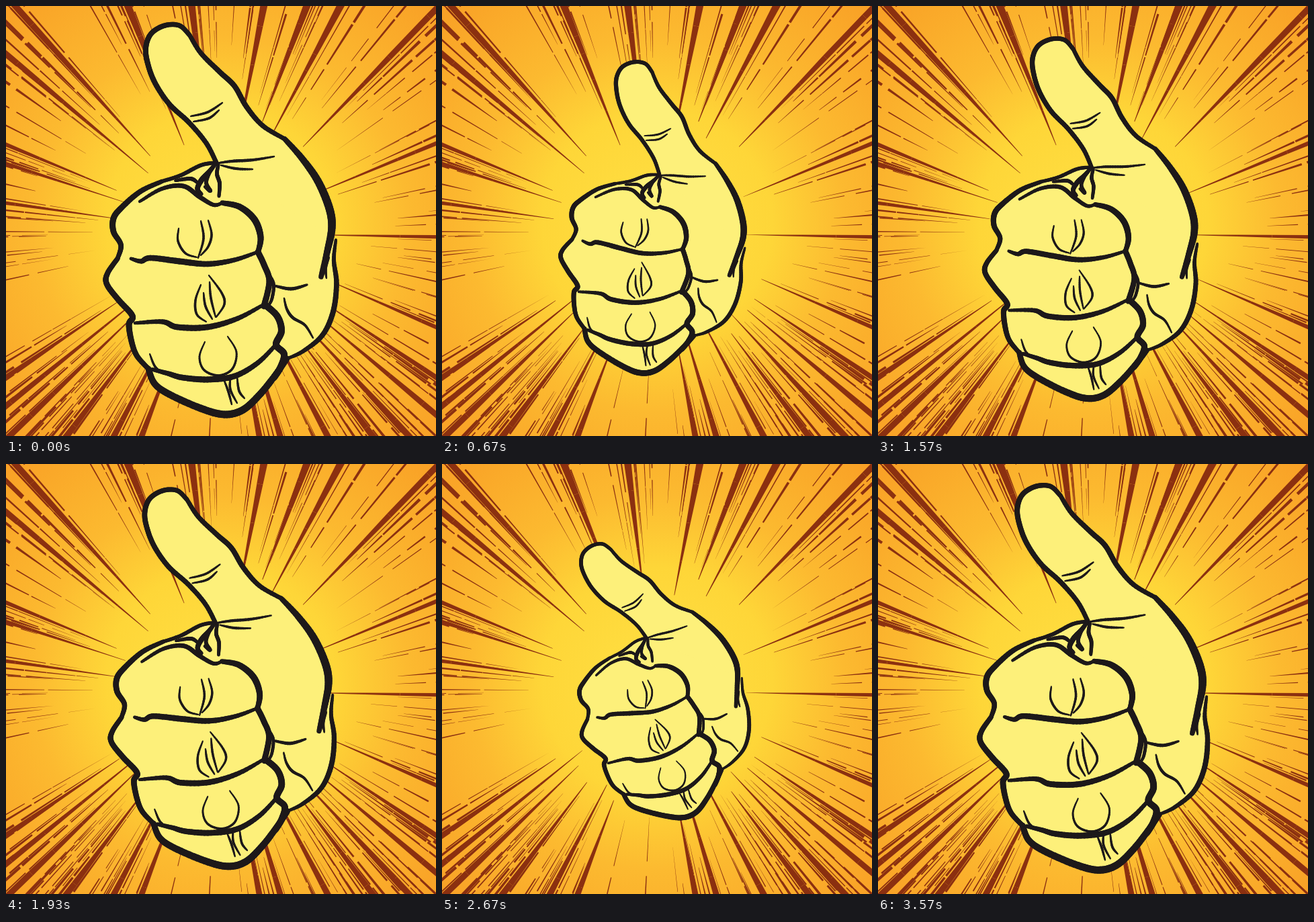
These frames come from a looping animation (640 by 640 pixels, 3610 ms). An HTML page with a canvas:

```html
<!DOCTYPE html>
<html lang="en">
<head>
<meta charset="utf-8">
<title>Thumbs up</title>
<style>
  html, body { margin: 0; height: 100%; overflow: hidden; background: #fbb02c; }
  canvas { display: block; width: 640px; height: 640px; }
</style>
</head>
<body>
<canvas id="stage" width="640" height="640"></canvas>
<script>
const SIZE = 640, LOOP = 3610, INK = '#1d191a', SKIN = '#fdf07a', RAY = '#8b3010';
const ctx = document.getElementById('stage').getContext('2d');

let seed = 11;
const random = (min, max) => {
  seed = (seed * 16807) % 2147483647;
  return min + (max - min) * seed / 2147483647;
};

// ---- Background: warm glow with comic speed lines ----
// Directions of the bold rays in degrees, clockwise from the right
const BOLD = [1, 23.5, 33.7, 40, 47, 53, 62, 73.4, 79, 111, 117.5, 127, 136, 141,
  146, 188, 198, 202.5, 220, 228, 248, 263, 281, 291, 298, 314, 337.5];

// A ray widens outwards; gaps between its pieces make it look dry-brushed
function ray(g, degrees, inner, width, gap) {
  g.save();
  g.translate(318, 338);
  g.rotate(degrees * Math.PI / 180);
  const half = r => width / 2 * Math.min(1, (r - inner + 15) / (400 - Math.min(inner, 300)));
  for (let r = inner; r < 480;) {
    const end = r + random(25, 90);
    g.beginPath();
    g.moveTo(r, -half(r));
    g.lineTo(end, -half(end));
    g.lineTo(end, half(end));
    g.lineTo(r, half(r));
    g.fill();
    r = end + random(0, gap);
  }
  g.restore();
}

function makeBackground() {
  const canvas = document.createElement('canvas');
  canvas.width = canvas.height = SIZE;
  const g = canvas.getContext('2d');
  const glow = g.createRadialGradient(320, 325, 0, 320, 325, 450);
  glow.addColorStop(0, '#ffe043');
  glow.addColorStop(.38, '#fed638');
  glow.addColorStop(.62, '#fcba30');
  glow.addColorStop(1, '#f9a126');
  g.fillStyle = glow;
  g.fillRect(0, 0, SIZE, SIZE);

  g.fillStyle = RAY;
  for (const angle of BOLD) {
    const steep = Math.abs(Math.sin(angle * Math.PI / 180));
    ray(g, angle, random(135, 190), 7 + 6 * steep ** 3, 0);
    for (let i = 0; i < 4; i++)
      ray(g, angle + random(-6, 6), random(180, 300), random(1.5, 4.5), 14);
  }
  for (let i = 0; i < 70; i++)
    ray(g, random(0, 360), random(180, 320), random(1.2, 2.8), 22);
  return canvas;
}

// ---- Hand: smooth curves through a few points ----
function curve(text) {
  const pts = text.split(' ').map(p => p.split(',').map(Number));
  const at = i => pts[Math.max(0, Math.min(pts.length - 1, i))];
  const out = [];
  for (let i = 0; i < pts.length - 1; i++) {
    const [a, b, c, d] = [at(i - 1), at(i), at(i + 1), at(i + 2)];
    for (let u = 0; u < 1; u += .125)
      out.push([0, 1].map(k => b[k] + .5 * u * (c[k] - a[k] +
        u * (2 * a[k] - 5 * b[k] + 4 * c[k] - d[k] + u * (3 * (b[k] - c[k]) + d[k] - a[k])))));
  }
  return [...out, at(pts.length - 1)];
}

// Brush strokes swell in the middle; taper is the share of width lost at the ends
const strokes = [];
function ink(width, taper, text) {
  const pts = curve(text);
  strokes.push({ pts, width: u => width * (1 - taper + taper * Math.sin(Math.PI * u)) });
  return pts;
}

// Outline
const thumb = [
  ...ink(8, .15, '313,233 298,204 272,173 243,146 222,115 211,86 208,62 216,41 236,29 258,29 273,43'),
  ...ink(8, .2, '273,43 290,70 318,98 340,119 358,150 382,178 415,198'),
  ...ink(12, .4, '415,198 440,226 464,260 481,300 485,330 478,366 469,403')
];
const fist = [
  ...ink(8, .5, '491,348 488,378 492,413 487,455 471,490 442,514 418,525'),
  ...ink(11, .2, '418,525 402,548 379,577 353,601 325,608 290,599 243,578 221,562 212,540'),
  ...ink(9, .2, '212,540 195,521 187,500 183,474 188,461 167,437 150,414 151,398 166,376'),
  ...ink(9, .3, '166,376 171,356 160,336 160,316 172,300 200,276 232,261'),
  ...ink(6, .1, '232,261 260,252 290,237 313,233')
];

// Fingers
ink(7, .4, '199,291 232,272 264,268 288,284 309,296 322,293');
ink(10, .3, '322,293 348,299 370,318 379,344 375,367');
ink(9, .5, '186,376 201,380 215,375 258,380 300,384 340,378 375,366');
ink(9, 0, '375,366 384,385 392,410 384,447');
ink(9, .5, '192,472 233,470 255,478 300,478 345,465 386,443');
ink(10, 0, '386,445 404,462 410,484 402,504 414,518 409,537 399,553');
ink(9, .4, '218,541 241,547 262,553 300,556 340,551 375,531 403,503');
ink(3.5, .5, '214,518 222,537 235,547');
ink(5, .3, '386,392 398,412 396,435 390,447');

// Base of the thumb and palm
ink(8, .4, '313,233 303,246 291,259 285,272 291,280');
ink(6, .3, '306,242 298,262 304,275 296,269');
ink(6, .2, '316,236 314,250 318,264 317,283');
ink(6, .4, '252,260 275,257 286,264');
ink(4.5, .5, '314,234 336,231 368,229 399,224');
ink(4, .5, '320,237 342,242 367,243');
ink(5, .4, '398,416 424,421 448,415');
ink(4.5, .5, '414,435 418,451 427,464 445,475 457,494');
ink(4, .5, '481,374 476,390 477,405');

// Nails and creases
const creases = [
  '275,164 300,158 322,144', '279,172 302,167 317,155',
  '257,331 256,350 267,368 284,374', '290,320 294,346 286,375', '301,319 306,340 301,358 290,371',
  '290,415 282,438 284,459 298,470', '302,401 321,427 325,444 313,463',
  '303,411 305,435 312,463', '294,427 297,447 307,466',
  '296,500 288,522 295,542 317,550 337,540 343,515 330,492',
  '325,558 331,574 336,593', '334,553 334,571 344,591', '344,553 347,573 355,584'
];
creases.forEach(text => ink(3.6, .45, text));

function fill(pts) {
  ctx.beginPath();
  pts.forEach(p => ctx.lineTo(...p));
  ctx.fill();
}

function drawHand() {
  ctx.fillStyle = SKIN;
  fill(thumb);
  fill(fist);
  ctx.strokeStyle = INK;
  ctx.lineCap = 'round';
  for (const { pts, width } of strokes)
    for (let i = 1; i < pts.length; i++) {
      ctx.lineWidth = width(i / pts.length);
      ctx.beginPath();
      ctx.moveTo(...pts[i - 1]);
      ctx.lineTo(...pts[i]);
      ctx.stroke();
    }
}

// ---- Motion: shrink leaning right and return, then the same leaning left ----
const TURN = 1835;
function poseAt(t) {
  const leansRight = t < TURN;
  const u = leansRight ? t / TURN : (t - TURN) / (LOOP - TURN);
  const depth = 1 - Math.abs(2 * u - 1);
  return { scale: 1 - .288 * depth, tilt: (leansRight ? 1 : -1) * 10.6 * depth * Math.PI / 180 };
}

const background = makeBackground();
const start = performance.now();
function draw() {
  const { scale, tilt } = poseAt((performance.now() - start) % LOOP);
  ctx.drawImage(background, 0, 0);
  ctx.save();
  ctx.translate(320, 320);
  ctx.rotate(tilt);
  ctx.scale(scale, scale);
  ctx.translate(-320, -320);
  drawHand();
  ctx.restore();
  requestAnimationFrame(draw);
}
draw();
</script>
</body>
</html>
```
